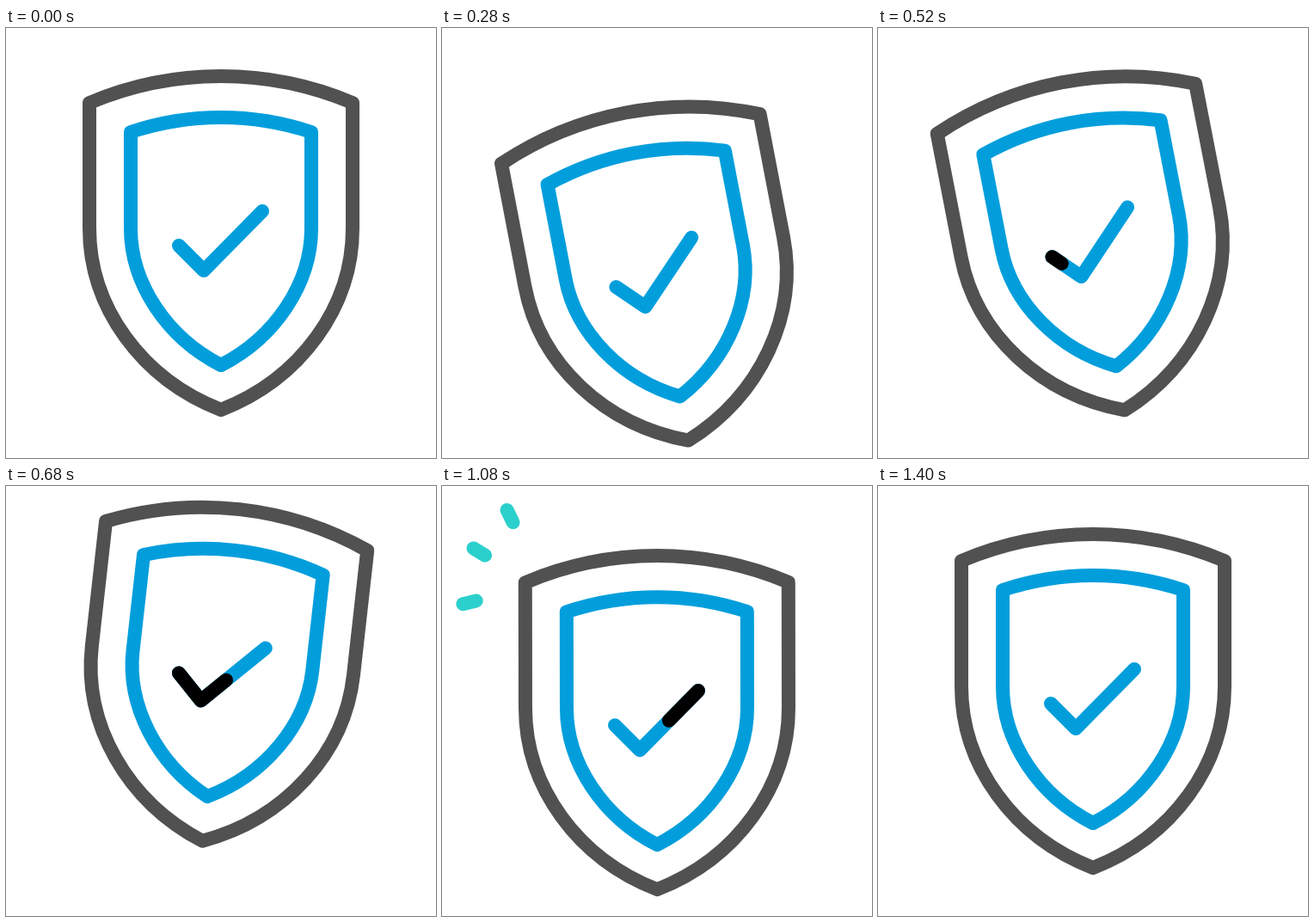
An HTML page for the animation above (2000 ms loop, 500 by 500 pixels).

```html
<!DOCTYPE html>
<html lang="en">
<head>
<meta charset="utf-8">
<title>Shield check</title>
<style>
  html, body { margin: 0; width: 100%; height: 100%; overflow: hidden; background: #fff; }
  svg { display: block; width: 100%; height: 100%; }
  path { fill: none; stroke-width: 16; stroke-linecap: round; stroke-linejoin: round; }
</style>
</head>
<body>
<svg viewBox="0 0 500 500">
  <g id="shield">
    <path stroke="#515151" d="M97 87A393 393 0 0 1 403 87V233C403 324.5 342.5 408 250 444C157.5 408 97 324.5 97 233Z"/>
    <path stroke="#029edc" d="M145 121A333 333 0 0 1 355 121V233C355 297 313 360 250 392C187 360 145 297 145 233Z"/>
    <path stroke="#029edc" d="M201 253L230 282L298 213"/>
    <path id="ink" stroke="#000"/>
    <path id="sparks" stroke="#2bd0cc"/>
  </g>
</svg>
<script>
const STEP = 40, LOOP = 2000, LAST = 35;
const shield = document.getElementById('shield');
const ink = document.getElementById('ink');
const sparks = document.getElementById('sparks');

// Keys are [step, value]; every stretch eases in and out.
const TILT = [[0, 0], [11, -15.5], [18.1, 7.9], [24.2, -3.8], [28.9, 2], [LAST, 0]];
const LIFT = [[0, 0], [7.9, 40.5], [18.05, -32.2], [27.2, 25.2], [LAST, 0]];
const INK_END = [[10.8, 0], [22.1, 1]];
const INK_START = [[21, 0], [31, 1]];
const SPARK_END = [[20.5, 0], [27, 48]];
const SPARK_START = [[23, 0], [29.5, 48]];
const SPARK_OFF = 29;

const TICK = [[201, 253], [230, 282], [298, 213]];
// Inner end and outward direction of each spark
const RAYS = [
  [71.2, 100.5, -0.972, 0.235],
  [77.8, 71.9, -0.855, -0.519],
  [96.9, 45.9, -0.437, -0.9]
];

function ease(keys, n) {
  if (n <= keys[0][0]) return keys[0][1];
  for (let i = 1; i < keys.length; i++) {
    const [a, from] = keys[i - 1], [b, to] = keys[i];
    if (n < b) {
      const s = (n - a) / (b - a);
      return from + (to - from) * s * s * (3 - 2 * s);
    }
  }
  return keys[keys.length - 1][1];
}

const [A, B, C] = TICK;
const dist = (p, q) => Math.hypot(q[0] - p[0], q[1] - p[1]);
const mix = (p, q, k) => [p[0] + (q[0] - p[0]) * k, p[1] + (q[1] - p[1]) * k];
const SHORT = dist(A, B), TOTAL = SHORT + dist(B, C);

function tickPoint(len) {
  return len < SHORT ? mix(A, B, len / SHORT) : mix(B, C, (len - SHORT) / (TOTAL - SHORT));
}

function tickPart(start, end) {
  if (end <= start) return '';
  const a = start * TOTAL, b = end * TOTAL;
  const points = [tickPoint(a)];
  if (a < SHORT && b > SHORT) points.push(B);
  points.push(tickPoint(b));
  return 'M' + points.join('L');
}

function sparkPart(start, end) {
  if (end <= start) return '';
  return RAYS.map(([x, y, dx, dy]) =>
    `M${x + dx * start} ${y + dy * start}L${x + dx * end} ${y + dy * end}`).join('');
}

function draw(time) {
  const n = Math.min(LAST, Math.floor((time % LOOP) / STEP));
  shield.setAttribute('transform',
    `translate(0 ${ease(LIFT, n)}) rotate(${ease(TILT, n)} 250 250)`);
  ink.setAttribute('d', tickPart(ease(INK_START, n), ease(INK_END, n)));
  sparks.setAttribute('d',
    n < SPARK_OFF ? sparkPart(ease(SPARK_START, n), ease(SPARK_END, n)) : '');
}

const begin = performance.now();
function tick() {
  draw(Math.max(0, performance.now() - begin));
  requestAnimationFrame(tick);
}
tick();
</script>
</body>
</html>
```
